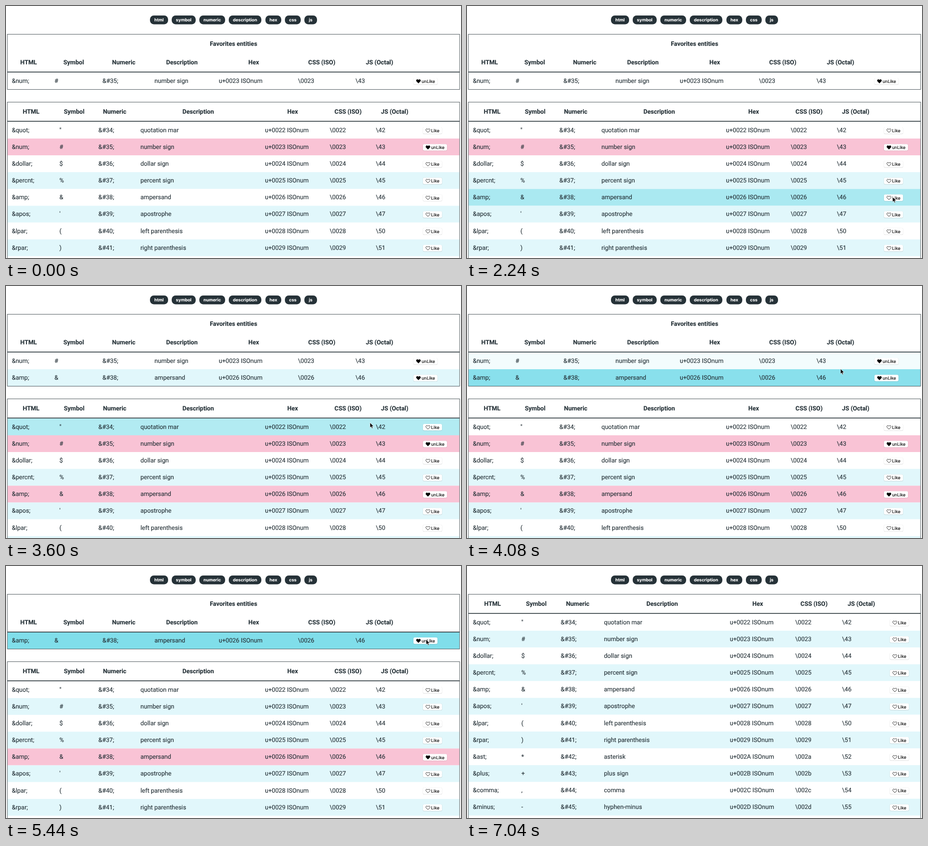
Recreate the animation shown at these times as an HTML page. Size 1005 px wide and 557 px high, loop 7.52 s.

```html
<!DOCTYPE html>
<html lang="en">
<head>
<meta charset="utf-8">
<title>Entity favorites</title>
<style>
  html, body { margin: 0; width: 100%; height: 100%; overflow: hidden; background: #fff; }
  svg { display: block; width: 1005px; height: 557px; }
  text { font: 13.5px Roboto, sans-serif; fill: #263238; stroke: #263238; stroke-width: .15;
    white-space: pre; text-rendering: geometricPrecision; }
  .head { font-weight: 700; text-anchor: middle; }
  .pill { fill: #263238; }
  .pill-text { font: 700 9.6px Inter, sans-serif; text-anchor: middle; fill: #fff; stroke: #fff; }
  .button-text { font: 9.5px Inter, sans-serif; fill: #000; stroke: #000; }
  .button { fill: #fff; }
  .shadow { fill: rgba(0, 0, 0, .13); }
  .heart { stroke: #000; stroke-width: .9; }
  .box { fill: none; stroke: #263238; stroke-width: .845; }
  .line { fill: #263238; }
</style>
</head>
<body>
<svg viewBox="0 0 1005 557">
  <g id="page"></g>
  <path id="cursor" d="M0 0V11.2L2.6 8.9L4.4 13L6.3 12.2L4.6 8.2H8Z" stroke="#fff" stroke-width=".8"/>
</svg>
<script>
const LOOP = 7520, STEP = 80, FADE = 200, PITCH = 37.15;
const LEFT = 3, RIGHT = 1002;
const WHITE = [255, 255, 255], STRIPE = [225, 247, 251], HOVER = [128, 222, 234], PINK = [249, 195, 213];

const pills = [['html', 318, 40], ['symbol', 366, 53], ['numeric', 427, 57], ['description', 492, 72],
  ['hex', 573, 35], ['css', 616, 35], ['js', 659, 28]];
const titles = ['HTML', 'Symbol', 'Numeric', 'Description', 'Hex', 'CSS (ISO)', 'JS (Octal)'];
const firstCode = 34;
const entities = [['quot', 'quotation mar'], ['num', 'number sign'], ['dollar', 'dollar sign'],
  ['percnt', 'percent sign'], ['amp', 'ampersand'], ['apos', 'apostrophe'], ['lpar', 'left parenthesis'],
  ['rpar', 'right parenthesis'], ['ast', 'asterisk'], ['plus', 'plus sign'], ['comma', 'comma'],
  ['minus', 'hyphen-minus']];

// Column starts (the last is the button) and header centres.
const favoriteColumns = { cells: [13, 107, 213, 328, 470, 645, 772, 900], heads: [50, 149.5, 260, 388.5, 547, 697.5, 825] };
const narrowColumns = { cells: [13, 118, 204, 297, 572, 715, 817, 921], heads: [55.5, 150.5, 240, 424.5, 633, 755.5, 858.5] };
const wideColumns = { cells: [13, 120, 207, 302.5, 580.5, 725, 828.5, 934], heads: [56.5, 153, 244.5, 431, 642, 766.5, 871] };

const states = [
  { from: 0, favorites: [35], top: 212, shift: 0 },
  { from: 2640, favorites: [35, 38], top: 249, shift: 0 },
  { from: 5040, favorites: [38], top: 211, shift: -1 },
  { from: 6160, favorites: [], top: 62, shift: 0 }
];
const likes = [['35', -FADE, 5040], ['38', 2640, 6160]];
const hovers = [['main38', 2162, 2640], ['main37', 2640, 3330], ['main36', 3330, 3430], ['main34', 3530, 3650],
  ['fav38', 3850, 4060], ['fav35', 4060, 5040], ['fav38', 5040, 6160], ['main35', 6140, 6326]];
for (let i = 0; i < 10; i++) hovers.push(['main' + (36 + i), 6326 + 54.6 * i, 6380.6 + 54.6 * i]);

const path = [[1520, 911, 170], [1760, 943, 429], [2080, 943, 429], [2240, 940, 422], [3200, 940, 422],
  [3600, 804, 302], [3840, 778, 222], [4080, 825, 183], [4320, 922, 165], [4400, 928, 163],
  [6080, 928, 162], [6320, 899, 176], [6880, 835, 558]];

const page = document.getElementById('page');
const cursor = document.getElementById('cursor');
const clamp = x => Math.min(1, Math.max(0, x));
const lerp = (a, b, k) => a + (b - a) * k;
const mix = (a, b, k) => a.map((v, i) => lerp(v, b[i], k));

// CSS "ease": cubic-bezier(.25, .1, .25, 1)
function ease(x) {
  x = clamp(x);
  if (x === 0 || x === 1) return x;
  let lo = 0, hi = 1, u;
  for (let i = 0; i < 20; i++) {
    u = (lo + hi) / 2;
    const bx = .75 * u * (1 - u) + u ** 3;
    if (bx < x) lo = u; else hi = u;
  }
  return .3 * u * (1 - u) ** 2 + 3 * u * u * (1 - u) + u ** 3;
}

function level(spans, key, t) {
  return Math.max(0, ...spans.filter(s => s[0] === key).map(([, from, to]) =>
    ease((Math.min(t, to) - from) / FADE) * (1 - ease((t - to) / FADE))));
}

const text = (x, y, string, kind = '') =>
  `<text class="${kind}" x="${x}" y="${y}">${string.replace(/&/g, '&amp;')}</text>`;
const rect = (kind, x, y, width, height, extra = '') =>
  `<rect class="${kind}" x="${x}" y="${y}" width="${width}" height="${height}" ${extra}/>`;
const box = (top, bottom) => rect('box', LEFT, top + .4, RIGHT - LEFT, bottom - top);

const pill = ([label, x, width]) =>
  rect('pill', x, 21, width, 19.6, 'rx="8.5"') + text(x + width / 2, 34.4, label, 'pill-text');

function button(x, middle, liked) {
  const width = liked ? 53 : 42, y = middle - 7;
  return rect('shadow', x - .4, y - .1, width + .8, 15.3, 'rx="3.2"') +
    rect('button', x, y, width, 14.3, 'rx="3"') +
    `<path class="heart" fill="${liked ? '#000' : 'none'}" transform="translate(${x + 6} ${y + 3})"
      d="M5 8.5L1.1 4.6C-.6 2.6 1 .5 2.6 .5C3.8 .5 4.5 1.2 5 2C5.5 1.2 6.2 .5 7.4 .5C9 .5 10.6 2.6 8.9 4.6Z"/>` +
    text(x + 18, middle + 3.9, liked ? 'unLike' : 'Like', 'button-text');
}

const heads = (columns, baseline) =>
  titles.map((title, i) => text(columns.heads[i], baseline, title, 'head')).join('') +
  rect('line', LEFT, baseline + 16.1, RIGHT - LEFT, 1.7);

function row(columns, table, code, index, start, shift, liked, t) {
  const [name, description] = entities[code - firstCode];
  const top = start + index * PITCH;
  const baseline = top + 22.9 + shift;
  const hex = code.toString(16).padStart(4, '0');
  let color = mix(index % 2 ? STRIPE : WHITE, HOVER, level(hovers, table + code, t));
  if (table === 'main') color = mix(color, PINK, level(likes, String(code), t));
  const labels = [`&${name};`, String.fromCharCode(code), `&#${code};`, description,
    `u+${hex.toUpperCase()} ISOnum`, '\\' + hex, '\\' + code.toString(8)];
  return rect('row', LEFT + .4, top, RIGHT - LEFT - .8, PITCH + shift, `fill="rgb(${color.map(Math.round)})"`) +
    labels.map((label, i) => text(columns.cells[i], baseline, label)).join('') +
    button(columns.cells[7], baseline - 3.7, liked);
}

function draw(t) {
  const { favorites, top, shift } = states.findLast(s => s.from <= t);
  const parts = pills.map(pill);

  if (favorites.length) {
    parts.push(text(502.5, 87.8, 'Favorites entities', 'head'),
      ...favorites.map((code, i) => row(favoriteColumns, 'fav', code, i, 146.8, shift, true, t)),
      heads(favoriteColumns, 129), box(62, top - 28));
  }

  const columns = favorites.length ? narrowColumns : wideColumns;
  parts.push(...entities.map((_, i) => {
    const code = firstCode + i;
    return row(columns, 'main', code, i, top + 43.8, 0, favorites.includes(code), t);
  }), heads(columns, top + 25.8), box(top, 600));
  page.innerHTML = parts.join('');
  drawCursor(t);
}

function drawCursor(t) {
  const next = path.findIndex(p => p[0] > t);
  cursor.style.display = next > 0 ? 'block' : 'none';
  if (next < 1) return;
  const [t0, x0, y0] = path[next - 1], [t1, x1, y1] = path[next];
  const k = (t - t0) / (t1 - t0);
  cursor.setAttribute('transform', `translate(${lerp(x0, x1, k)} ${lerp(y0, y1, k)})`);
}

const begin = performance.now();
let shown = -1;
function tick() {
  const elapsed = Math.max(0, performance.now() - begin) % LOOP;
  const t = Math.floor(elapsed / STEP) * STEP;
  if (t !== shown) draw(shown = t);
  requestAnimationFrame(tick);
}
tick();
</script>
</body>
</html>
```
